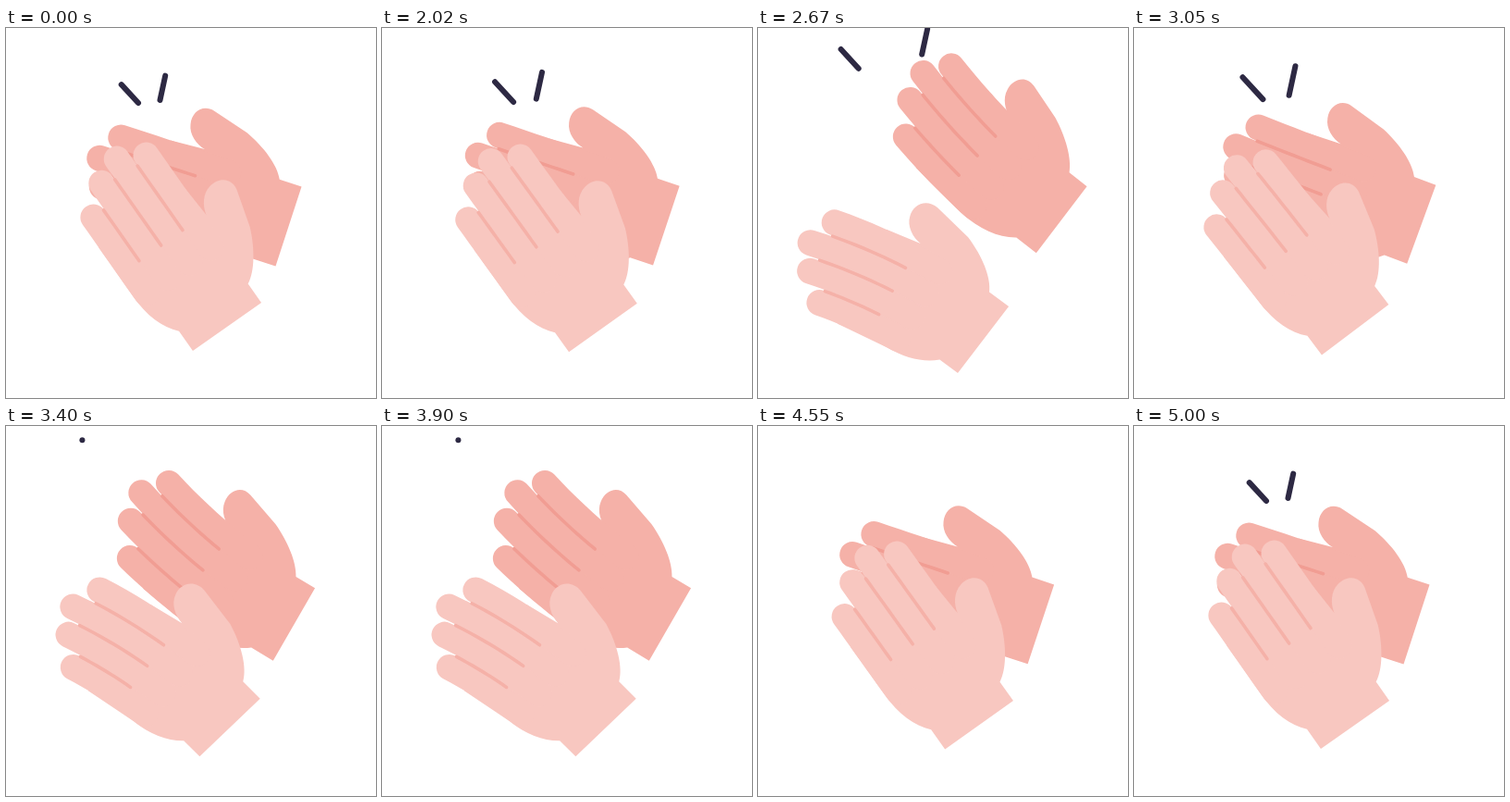
An HTML page for the animation above (5020 ms loop, 400 by 400 pixels).

```html
<!DOCTYPE html>
<html lang="en">
<head>
<meta charset="utf-8">
<title>Clapping hands</title>
<style>
  html, body { margin: 0; width: 100%; height: 100%; overflow: hidden; background: #fff; }
  svg { display: block; width: 100%; height: 100%; }
  path { stroke-linecap: round; stroke-linejoin: round; }
</style>
</head>
<body>
<svg id="stage" viewBox="0 0 400 400"></svg>
<script>
const LOOP = 5020, REST = 2000, STEP = 25, CLAP = 500, CLAPS = 5;
const SVG = 'http://www.w3.org/2000/svg';
const stage = document.getElementById('stage');

function add(parent, tag, attrs = {}) {
  const node = document.createElementNS(SVG, tag);
  for (const key in attrs) node.setAttribute(key, attrs[key]);
  return parent.appendChild(node);
}

const clamp = x => Math.max(0, Math.min(1, x));
const mix = (a, b, k) => a + (b - a) * k;
// a shapes the start of the move, b its end
const ease = (x, a, b) => 1 - (1 - clamp(x) ** a) ** b;

// Hand space: x runs from the wrist to the fingertips, y towards the thumb.
const CUFF = 90.5, AXIS = -36;
const FINGERS = [[202, -10.2], [217, -38.5], [205, -67], [180, -95.5]];
const CREASES = [[198, -24.5], [200, -53], [180, -82]];
const PALM = [
  ['M', 0, 0], ['L', 25, 0],
  ['C', 32, 14, 52, 28, 74, 37], ['L', 115, 48.5],
  ['C', 129, 52, 138, 40, 135, 27], ['C', 133, 16, 122, 8, 112, 6],
  ['L', 150, 3.6], ['L', 150, -109.5], ['L', 85, -109.5],
  ['C', 60, -109.5, 40, -103, 26, -CUFF], ['L', 0, -CUFF]
];

// Leans a point of the straight hand along a circular arc.
function bend(x, y, curve) {
  if (Math.abs(curve) < 1e-6) return [x, y];
  const angle = curve * x;
  return [
    Math.sin(angle) / curve + (y - AXIS) * Math.sin(angle) * 0.75,
    y - (1 - Math.cos(angle)) / curve
  ];
}

const point = (x, y, curve) => bend(x, y, curve).map(n => n.toFixed(2)).join(' ');

function strip(from, to, y, curve) {
  const points = [];
  for (let i = 0; i <= 10; i++) points.push(point(mix(from, to, i / 10), y, curve));
  return 'M' + points.join('L');
}

function palmPath(curve, thumbCurve) {
  return PALM.map(([command, ...xy]) => {
    const points = [];
    for (let i = 0; i < xy.length; i += 2) {
      points.push(point(xy[i], xy[i + 1], xy[i + 1] > 5 ? thumbCurve : curve));
    }
    return command + points.join(' ');
  }).join('') + 'Z';
}

// push shifts the open hand, swing shifts and rotates it; lag holds it open longer.
function makeHand({ skin, crease, x, y, angle, push, swing, curve, thumb, lag }) {
  const group = add(stage, 'g', { fill: 'none' });
  const palm = add(group, 'path', { fill: skin });
  const fingers = FINGERS.map(() => add(group, 'path', { stroke: skin, 'stroke-width': 28 }));
  const creases = CREASES.map(() => add(group, 'path', { stroke: crease, 'stroke-width': 3.6 }));
  return time => {
    const { move, turn, flex } = handPose(time, lag);
    const left = x + push.x * move + swing.x * turn;
    const top = y + push.y * move + swing.y * turn;
    const tilt = angle + swing.angle * turn + 180;
    const bow = curve * flex;
    group.setAttribute('transform', `translate(${left} ${top}) rotate(${tilt}) translate(0 ${CUFF / 2})`);
    palm.setAttribute('d', palmPath(bow, bow * thumb));
    FINGERS.forEach(([tip, v], i) => fingers[i].setAttribute('d', strip(80, tip, v, bow)));
    CREASES.forEach(([tip, v], i) => creases[i].setAttribute('d', strip(113, tip, v, bow)));
  };
}

function makeSpark(x, y, dx, dy) {
  const path = add(stage, 'path', { stroke: '#2d2943', 'stroke-width': 6, fill: 'none' });
  return time => {
    const { tail, front } = sparkPose(time);
    path.setAttribute('visibility', front > 0 ? 'visible' : 'hidden');
    path.setAttribute('d', `M${x + dx * tail} ${y + dy * tail}L${x + dx * front} ${y + dy * front}`);
  };
}

const FLEX = 1.06, SPARK = 27, REACH = 89.5;

function handPose(time, lag) {
  if (time >= CLAP * CLAPS) {
    const rebound = 0.16 * Math.sin(Math.PI * clamp(time / CLAP - CLAPS)) ** 2;
    return { move: rebound, turn: rebound, flex: rebound };
  }
  const half = (time % CLAP) / (CLAP / 2);
  if (half < 1) {
    return { move: ease(half, 1.5, 4), turn: ease(half, 2.5, 6), flex: FLEX * ease(half, 2, 2) };
  }
  const back = half - 1;
  return {
    move: 1 - ease(back / 0.6, 2, 2),
    turn: 1 - back ** (1.27 * lag),
    flex: FLEX * (1 - back ** (2.9 * lag))
  };
}

function sparkPose(time) {
  const end = CLAP * CLAPS;
  if (time >= end) return { tail: 0, front: SPARK * ease((time - end - 150) / 350, 2, 2) };
  const phase = time % CLAP;
  if (phase >= 450) {
    return { tail: 0, front: time > end - CLAP ? 0 : SPARK * (phase - 450) / 50 };
  }
  return {
    tail: REACH * ease(phase / 375, 2, 3.4),
    front: mix(SPARK, REACH, ease(phase / 250, 1.5, 2))
  };
}

const parts = [
  makeHand({
    skin: '#f5b1a8', crease: '#f19d93', x: 305.5, y: 214.5, angle: 18.05,
    push: { x: 13.6, y: -7.5 }, swing: { x: 9.9, y: 0, angle: 20.05 },
    curve: -0.00156, thumb: 0.4, lag: 1.4
  }),
  makeHand({
    skin: '#f8c7c0', crease: '#f5b1a8', x: 239, y: 323, angle: 54.9,
    push: { x: -1.6, y: 8.15 }, swing: { x: 6.35, y: 6.35, angle: -18.2 },
    curve: 0.00204, thumb: 1, lag: 1
  }),
  makeSpark(143, 81, -0.677, -0.736),
  makeSpark(166.5, 78, 0.211, -0.977)
];

function render(now) {
  const step = Math.floor((now % LOOP - REST + 5) / STEP);
  const time = Math.max(0, step) * STEP;
  parts.forEach(draw => draw(time));
}

const start = performance.now();
function tick() {
  render(performance.now() - start);
  requestAnimationFrame(tick);
}
tick();
</script>
</body>
</html>
```
